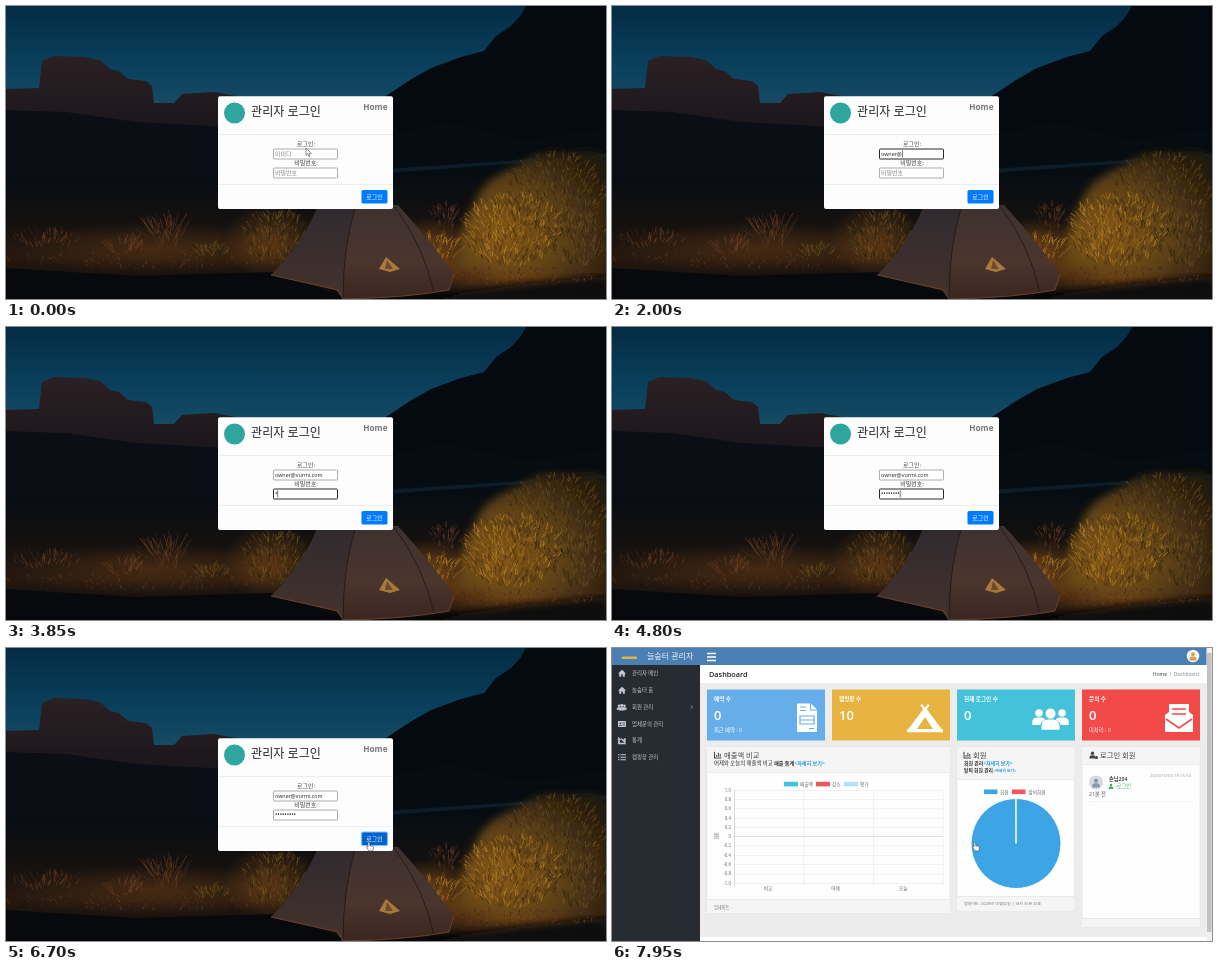
An HTML page for the animation above (8000 ms loop, 600 px wide and 293 px high).

```html
<!DOCTYPE html>
<html lang="ko">
<head>
<meta charset="utf-8">
<title>관리자 로그인</title>
<style>
  html, body { margin: 0; width: 100%; height: 100%; overflow: hidden; background: #06121c; }
  svg { display: block; width: 100%; height: 100%; }
  text { font-family: "Open Sans", "Noto Sans CJK KR", "Noto Sans CJK JP", sans-serif; white-space: pre; }
  .b { font-weight: 600; }
  .link { fill: #2496dc; font-weight: 600; }
</style>
</head>
<body>
<svg id="stage" viewBox="0 0 600 293">
  <defs>
    <linearGradient id="sky" x2="0" y2="1">
      <stop offset="0" stop-color="#042c45"/><stop offset=".55" stop-color="#0b435f"/><stop offset="1" stop-color="#245067"/>
    </linearGradient>
    <linearGradient id="rock" x2="0" y2="1">
      <stop offset="0" stop-color="#2b2023"/><stop offset=".35" stop-color="#211a1e"/><stop offset="1" stop-color="#0c1016"/>
    </linearGradient>
    <linearGradient id="soil" x2="0" y2="1">
      <stop offset="0" stop-color="#080d13"/><stop offset=".4" stop-color="#15110f"/><stop offset=".65" stop-color="#26180f"/><stop offset="1" stop-color="#07080b"/>
    </linearGradient>
    <linearGradient id="side" x2="0" y2="1">
      <stop offset="0" stop-color="#2f2a2f"/><stop offset="1" stop-color="#45322c"/>
    </linearGradient>
    <linearGradient id="front" x2="0" y2="1">
      <stop offset="0" stop-color="#3e3130"/><stop offset=".6" stop-color="#4b352d"/><stop offset="1" stop-color="#3a2620"/>
    </linearGradient>
    <radialGradient id="glow">
      <stop offset="0" stop-color="#9a5a1a"/><stop offset="1" stop-color="#9a5a1a" stop-opacity="0"/>
    </radialGradient>
    <radialGradient id="bush" cx=".3" cy=".68" r=".8">
      <stop offset="0" stop-color="#87591a"/><stop offset=".5" stop-color="#5c4016"/><stop offset="1" stop-color="#241a0e"/>
    </radialGradient>
    <filter id="soft"><feGaussianBlur stdDeviation=".7"/></filter>
    <filter id="softer"><feGaussianBlur stdDeviation="4"/></filter>
  </defs>
  <g id="login"></g>
  <g id="empty"></g>
  <g id="full"></g>
  <g id="mouse" stroke="#444" stroke-width=".6" fill="#fff">
    <path id="arrow" d="M0 0v7.5l1.8-1.6 1.1 2.6 1.1-.5-1.1-2.5h2.4z"/>
    <path id="beam" d="M-1.3-4h2.6M0-4v8M-1.3 4h2.6" fill="none"/>
    <path id="hand" d="M-1 .6q.9-1.2 1.7 0v3l3 .8q1 .3.8 1.5l-.6 3h-3.9l-2.6-3.7q.3-1.2 1.6-.2z"/>
  </g>
</svg>
<script>
const $ = id => document.getElementById(id);
const R = (x, y, w, h, fill, more = '') => `<rect x="${x}" y="${y}" width="${w}" height="${h}" fill="${fill}" ${more}/>`;
const T = (x, y, size, str, fill = '#333', more = '') =>
  `<text x="${x}" y="${y + size * .37}" font-size="${size}" fill="${fill}" ${more}>${str}</text>`;
const P = (d, fill, more = '') => `<path d="${d}" fill="${fill}" ${more}/>`;
const C = (x, y, r, fill, more = '') => `<circle cx="${x}" cy="${y}" r="${r}" fill="${fill}" ${more}/>`;
const mid = 'text-anchor="middle"', end = 'text-anchor="end"', bold = 'class="b"';

// ---------- camp scene ----------
let seed = 7;
const rnd = () => (seed = (seed * 16807) % 2147483647) / 2147483647;

// Blades scattered over an ellipse, leaning outwards; one path per colour.
function grass(cx, cy, rx, ry, n, len, colors) {
  const blades = colors.map(() => '');
  for (let i = 0; i < n; i++) {
    const a = rnd() * 6.283, r = Math.sqrt(rnd());
    const x = cx + Math.cos(a) * r * rx, y = cy + Math.sin(a) * r * ry;
    const lean = (x - cx) / rx * len * .6 + (rnd() - .5) * len * .8;
    blades[i % colors.length] += `M${x.toFixed(1)} ${y.toFixed(1)}l${lean.toFixed(1)} ${(-len * (.4 + rnd() * .6)).toFixed(1)}`;
  }
  return blades.map((d, i) => P(d, 'none', `stroke="${colors[i]}" opacity=".65"`)).join('');
}

const gold = ['#a97420', '#7c5619', '#3d2a10', '#c08a2c', '#5b3d14'];
const dusk = ['#5e4519', '#413010', '#755622', '#2a1f0e'];
const brown = ['#54301b', '#6d4024', '#38241a'];
const spot = (x, y, rx, ry, opacity) => `<ellipse cx="${x}" cy="${y}" rx="${rx}" ry="${ry}" fill="url(#glow)" opacity="${opacity}"/>`;

const scene = R(0, 0, 600, 293, '#060c12') + R(0, 0, 600, 125, 'url(#sky)') +
  '<g filter="url(#soft)">' +
  P('M-2 83 33 82 36 55 48 50 78 51 94 54 104 63 113 65 122 73 140 75 146 80 148 97 168 97 176 88 208 86 240 92V180H-2Z', 'url(#rock)') +
  P('M-2 104 60 106 130 116 240 122V185H-2Z', '#0b0f15') +
  P('M380 90 404 74 425 62 455 51 478 45 490 30 505 20 515 9 521-2H602V180H380Z', '#040a0f') +
  P('M380 130 440 116 520 134 602 122V190H380Z', '#050c12') +
  P('M380 163 600 148V151L380 167Z', '#0d1d27') +
  R(-2, 170, 604, 125, 'url(#soil)') +
  spot(150, 242, 150, 26, .3) + spot(265, 235, 48, 38, .5) + spot(425, 245, 50, 34, .7) + spot(510, 268, 120, 26, .7) +
  P('M-2 262 130 270 270 266 350 295H-2Z', '#07090c') +
  '</g>' +
  P('M452 262Q452 222 468 200 476 172 512 160 538 140 564 147 590 140 604 154V262Q530 276 452 262Z', 'url(#bush)', 'filter="url(#softer)"') +
  P('M420 292 520 278 602 270V295H420Z', '#100b09', 'filter="url(#softer)"') +
  `<g stroke-width="1" filter="url(#soft)">` +
  grass(550, 190, 50, 42, 420, 6, dusk) + grass(505, 225, 48, 36, 560, 7, gold) + grass(575, 235, 30, 26, 200, 7, dusk) +
  grass(425, 244, 28, 14, 150, 8, gold) + grass(440, 211, 15, 12, 70, 6, brown) + grass(510, 271, 85, 9, 160, 3, brown) +
  grass(270, 233, 34, 26, 260, 8, dusk) + grass(120, 242, 17, 7, 70, 10, brown) + grass(160, 230, 18, 13, 60, 17, brown) +
  grass(205, 245, 18, 6, 70, 7, dusk) + grass(42, 234, 34, 9, 70, 7, brown) + grass(130, 254, 130, 9, 160, 3, brown) +
  '</g>' +
  '<g filter="url(#soft)">' +
  P('M265 269Q298 236 312 199H352Q337 240 337 293L330 284Z', 'url(#side)') +
  P('M350 199H392Q424 234 448 268L443 284Q400 292 337 293 337 240 350 199Z', 'url(#front)') +
  P('M350 199Q337 240 337 293M388 200Q418 240 428 287', 'none', 'stroke="#231b1c" stroke-width="1"') +
  P('M265 269 332 284 337 293Q400 292 443 284L448 268', 'none', 'stroke="#6a4128" stroke-width="1"') +
  '</g>' +
  P('M373 263 380 251 394 263 384 266Z', '#a9793c') + P('M379 263 381 254 387 263Z', '#6d4c2e');

// ---------- login box ----------
const field = (id, y, hint, size) =>
  R(267.5, y, 64, 10, '#fff', `id="${id}Box" rx=".8" stroke="#999"`) +
  T(269, y + 5, 6, hint, '#888', `id="${id}Hint"`) + T(269, y + 5, size, '', '#222', `id="${id}"`);

$('login').innerHTML = scene +
  R(212, 90.3, 175, 112.7, '#fdfdfd', 'rx="2"') + R(212, 128, 175, .7, '#e5e7ea') + R(212, 178, 175, .7, '#e5e7ea') +
  C(228.5, 107, 10.5, '#2fa5a0') +
  T(245, 105.6, 12.1, '관리자 로그인', '#212529') + T(381.5, 100.5, 8.2, 'Home', '#777', end + ' font-weight="700"') +
  T(300, 138, 6, '로그인:', '#444', mid) + field('user', 143, '아이디', 5.4) +
  T(300, 157, 6, '비밀번호:', '#444', mid) + field('pass', 162, '비밀번호', 6.2) +
  R(355.5, 184, 26, 13.5, '#007bff', 'id="button" rx="1.6"') + T(368.5, 190.7, 6, '로그인', '#fff', mid) +
  R(0, 0, .6, 7, '#111', 'id="caret"');

// ---------- dashboard ----------
const link = '&lt;자세히 보기&gt;';
const house = (x, y) => P(`M${x - 4} ${y}l4-3.7 4 3.7h-1.2v3.3h-2v-2.3h-1.6v2.3h-2v-3.3z`, '#c4c8cc');
const person = (x, y, s, fill) => C(x, y - s * .45, s * .42, fill) +
  P(`M${x - s * .75} ${y + s * .9}v${-s * .3}q0-${s * .55} ${s * .55}-${s * .55}h${s * .4}q${s * .55} 0 ${s * .55} ${s * .55}v${s * .3}z`, fill);
const bars = (x, y) => P(`M${x} ${y - 3.2}v6.2h7M${x + 2} ${y + 1.7}v-1.7M${x + 3.9} ${y + 1.7}v-4M${x + 5.8} ${y + 1.7}v-2.8`, 'none', 'stroke="#444" stroke-width="1"');

const sideIcons = house(10, 25.5) + house(10, 42.5) +
  person(7, 59, 3, '#c4c8cc') + person(12.5, 59, 3, '#c4c8cc') + person(9.8, 59, 3.8, '#c4c8cc') +
  R(6, 73, 8, 6, '#c4c8cc', 'rx=".7"') + C(8.4, 75.3, .9, '#272c33') + P('M10.5 75h2.5M10.5 77h2.5M7 77.5h2.8', 'none', 'stroke="#272c33" stroke-width=".7"') +
  P('M6.3 89v7h7.7M7.5 95v-2.5l2-2 1.8 1.5 2-2v5z', '#c4c8cc', 'stroke="#c4c8cc" stroke-width=".6"') +
  P('M6 106.8h1.5M8.5 106.8h5.5M6 109.3h1.5M8.5 109.3h5.5M6 111.8h1.5M8.5 111.8h5.5', 'none', 'stroke="#c4c8cc" stroke-width="1.1"') +
  P('M79 57.5l1.6 1.6-1.6 1.6', 'none', 'stroke="#b6bac0" stroke-width=".7"');

const cardIcons =
  P('M185 55.5h13v7h7v21.5h-20zM199 55.5l6 6h-6z', '#fff') +
  P('M188 59h6M188 62.5h6M197 80.5h5M188 68h14v8h-14zM188 72h14', 'none', 'stroke="#66aeea" stroke-width="1.2"') +
  P('M310 56l3 3.8 3-3.8 1.6 1.2-2.8 4 15 20h1.2v3h-36v-3h1.2l15-20-2.8-4z', '#fff') + P('M313 69l8 12h-16z', '#e8b441') +
  person(427, 69, 9, '#fff') + person(450, 69, 9, '#fff') + person(438.5, 71, 14, '#43c2da') + person(438.5, 71, 12, '#fff') +
  P('M553 67l4-3v-8h20v8l4 3v17h-28z', '#fff') +
  P('M560 61h14M560 66h14M554 71l13 9 13-9', 'none', 'stroke="#f14a48" stroke-width="1.6"');

function panel(x, y, w, h, head, foot) {
  return R(x, y, w, h, '#fefefe', 'stroke="#dfe1e3" stroke-width=".6"') +
    R(x, y, w, head, '#f5f5f6') + R(x, y + head, w, .6, '#e0e2e4') +
    R(x, y + h - foot, w, foot, '#f5f5f6') + R(x, y + h - foot, w, .6, '#e0e2e4');
}

function barChart() {
  let out = '';
  const key = (x, c, s) => R(x, 133.8, 14, 4.6, c) + T(x + 16, 136, 4.6, s, '#666');
  out += key(172, '#43c0e0', '매출액') + key(204, '#f0565b', '감소') + key(232, '#b8e0f2', '평가');
  for (let i = 0; i <= 10; i++) {
    const y = 142 + i * 9.3;
    out += R(121, y, 210, .5, i == 5 ? '#bbb' : '#e3e3e3') + T(119, y, 4.4, i == 5 ? '0' : (1 - i / 5).toFixed(1), '#666', end);
  }
  for (let i = 0; i < 4; i++) out += R(122 + i * 69.6, 142, .5, 96, i ? '#e3e3e3' : '#bbb');
  ['비교', '어제', '오늘'].forEach((s, i) => out += T(156 + i * 67.6, 240.5, 4.6, s, '#666', mid));
  return out + T(0, 0, 4.4, '(원)', '#666', mid + ' transform="translate(104 188) rotate(-90)"');
}

function dashboard(full) {
  const step = full ? 125 : 126.2, w = full ? 118 : 119;
  const col = i => 95 + i * step, top = full ? 99 : 84, right = full ? 587 : 591, shift = full ? 3 : 0;
  let out = R(0, 0, 600, 293, '#ececec') + R(0, 0, 600, 17, '#4a7fb4') + R(0, 17, 88, 276, '#272c33') + R(88, 17, 512, 18, '#fff') +
    T(full ? 35 : 24, 8.5, 8, '늘숲터 관리자', '#e8eff6') +
    T(97, 26.5, 7.3, 'Dashboard', '#222', bold) +
    T(right, 26, 4.9, '<tspan fill="#333">Home</tspan>  /  Dashboard', '#7c8590', end);
  ['관리자 메인', '늘숲터 홈', '회원 관리', '업체문의 관리', '통계', '캠핑장 관리'].forEach((s, i) =>
    out += T(20, 25.3 + i * 16.8, 5.4, s, '#c9ccd0'));

  [['예약 수', '#66aeea', '0', full ? '최근 예약 : 0' : '최근 예약 : 15'], ['캠핑장 수', '#e8b441', '10', ''],
   ['현재 로그인 수', '#43c2da', '0', ''], ['문의 수', '#f14a48', '0', full ? '미처리 : 0' : '미처리 :']].forEach(([name, c, n, note], i) => {
    const x = col(i) + 7;
    out += R(col(i), 41.5, w, full ? 51 : 31, c) + T(x, 51, 5.6, name, '#fff', bold) +
      (full ? T(x, 67.5, 13, n, '#fff', bold) : '') + T(x, full ? 82 : 62, 5.3, note, '#fff');
  });

  const x2 = col(2) + (full ? 0 : .5), x3 = col(3);
  out += panel(95, top, w + step, full ? 166 : 107, full ? 25 : 24, 14) +
    panel(x2, top, w - .5, full ? 164 : 114, full ? 32 : 31, 15) +
    panel(x3, top, w, 180, full ? 17 : 18, 9) +
    T(109 + shift, top + 8, 7.3, '매출액 비교', '#444') +
    T(102, top + 16, 5.4, `어제와 오늘의 매출액 비교 <tspan class="b" font-size="5.1">매출 통계</tspan><tspan class="link" font-size="5.1">${link}</tspan>`) +
    T(361, top + 8, 7.3, '회원', '#444') +
    T(355 - shift, top + 16, 4.9, `회원 관리<tspan class="link">${link}</tspan>`, '#333', bold) +
    T(355 - shift, top + 23.3, 4.8, `탈퇴 회원 관리<tspan class="link" font-size="3.9">${link}</tspan>`, '#333', bold) +
    T(full ? 488 : 487, top + 8, 7.3, '로그인 회원', '#444') +
    T(102, full ? 259 : 184, 4.2, '업데이트 :', '#777') +
    T(355 - shift, full ? 256 : 190.5, full ? 3.9 : 4.2, full ? '업데이트 : 2020년 10월02일 | 18시 35분 26초' : '업데이트 :', '#777');

  if (!full) return out + T(480, 115, 5.5, '로그인한 회원이 없습니다.', '#555') + R(480, 123, 105, .6, '#e4e4e4');

  return out + sideIcons + cardIcons + barChart() +
    R(10, 8.5, 15, 2.5, '#e3b23c') +
    P('M95 5.5h9M95 9h9M95 12.5h9', 'none', 'stroke="#fff" stroke-width="1.4"') +
    C(581, 8, 6.3, '#f4f4f0') + person(581, 8.3, 4.6, '#d8a24c') +
    bars(102.5, 107) + bars(352, 107) + person(480.5, 107, 4, '#444') + C(484.5, 109.5, 1.6, '#444') +
    R(372, 141.5, 13.5, 4.6, '#3da5e6') + T(388, 144, 4.6, '회원', '#666') +
    R(400, 141.5, 13.5, 4.6, '#f4565d') + T(416.5, 144, 4.6, '탈퇴회원', '#666') +
    P('', '#3da5e6', 'id="pie" stroke="#fff" stroke-width="1" stroke-linejoin="round"') +
    C(484, 134.5, 7, '#d5dbe0') + person(484, 135, 5, '#8a98a5') +
    T(497, 131, 5.2, '손님204', '#333', bold) + T(579, 127.3, 4.3, '2020/10/03 18:15:54', '#999', end) +
    person(499, 138.3, 3, '#35b05a') + T(503, 138.5, 5.2, '-로그인', '#35b05a') + T(477, 146, 5.2, '21분 전', '#555') +
    R(477, 153, 104, .5, '#e6e6e6') +
    R(88, 289, 507, 4, '#fff') + R(594.5, 0, 5.5, 293, '#f1f1f1') + R(595, 5, 4.5, 279, '#c1c1c1');
}
$('empty').innerHTML = dashboard(false);
$('full').innerHTML = dashboard(true);

// ---------- timeline ----------
const mail = 'owner@vurmi.com';
const mailKeys = [950, 1050, 1150, 1300, 1400, 2000, 2300, 2450, 2550, 2650, 2850, 3000, 3100, 3250, 3350];
const passKeys = [3850, 3950, 4050, 4200, 4450, 4550, 4650, 4800, 5150];
const typed = (keys, t) => keys.filter(k => k <= t).length;
const show = (id, on) => $(id).setAttribute('visibility', on ? 'visible' : 'hidden');
const set = (id, attrs) => { for (const k in attrs) $(id).setAttribute(k, attrs[k]); };
const ease = p => { p = Math.min(1, Math.max(0, p)); return p * p * (3 - 2 * p); };

function fillField(id, str, focus) {
  $(id).textContent = str;
  show(id + 'Hint', !str);
  set(id + 'Box', { stroke: focus ? '#2a2a2a' : '#999', 'stroke-width': focus ? 1 : .8 });
}

function drawLogin(t) {
  const focus = t < 750 ? '' : t < 3550 ? 'user' : t < 6500 ? 'pass' : '';
  fillField('user', mail.slice(0, typed(mailKeys, t)), focus == 'user');
  fillField('pass', '•'.repeat(typed(passKeys, t)), focus == 'pass');
  const blink = t >= 1900 && t < 2000 || t >= 5700 && t < 6200;
  show('caret', focus && !blink);
  if (focus) set('caret', { x: 269.2 + ($(focus).textContent ? $(focus).getComputedTextLength() : 0), y: focus == 'user' ? 144.5 : 163.5 });
  const pressed = t >= 6500;
  set('button', { fill: pressed ? '#0062cc' : t >= 6200 ? '#0069d9' : '#007bff',
    stroke: pressed ? '#80bdff' : 'none', 'stroke-width': 1.2 });
}

function drawMouse(t) {
  const late = t >= 5700, p = late ? ease((t - 5700) / 550) : ease(t / 500);
  const x = late ? 296 + 67 * p : 300 - 4 * p, y = late ? 149 + 45 * p : 142 + 7 * p;
  const over = x >= 355 && y >= 184;
  const kind = t >= 950 && !late ? '' : over ? 'hand' : x < 332 && y > 143 && y < 153 ? 'beam' : 'arrow';
  for (const k of ['arrow', 'beam', 'hand']) show(k, k == kind);
  set('mouse', { transform: `translate(${x} ${y})` });
}

function drawPie(t) {
  const p = Math.min(1, Math.max(0, (t - 7300) / 650));
  const a = Math.min(6.282, 6.2832 * (1 - (1 - p) ** 4)), r = 45;
  set('pie', { d: `M404 195.5V150.5A${r} ${r} 0 ${a > Math.PI ? 1 : 0} 1 ${404 + r * Math.sin(a)} ${195.5 - r * Math.cos(a)}Z` });
}

const start = performance.now();
function frame() {
  const t = Math.floor((performance.now() - start) % 8000 / 50) * 50;
  const view = t < 6900 ? 'login' : t < 7350 ? 'empty' : 'full';
  for (const id of ['login', 'empty', 'full']) $(id).style.display = id == view ? '' : 'none';
  if (view == 'login') drawLogin(t);
  if (view == 'full') drawPie(t);
  drawMouse(t);
  requestAnimationFrame(frame);
}
frame();
</script>
</body>
</html>
```
